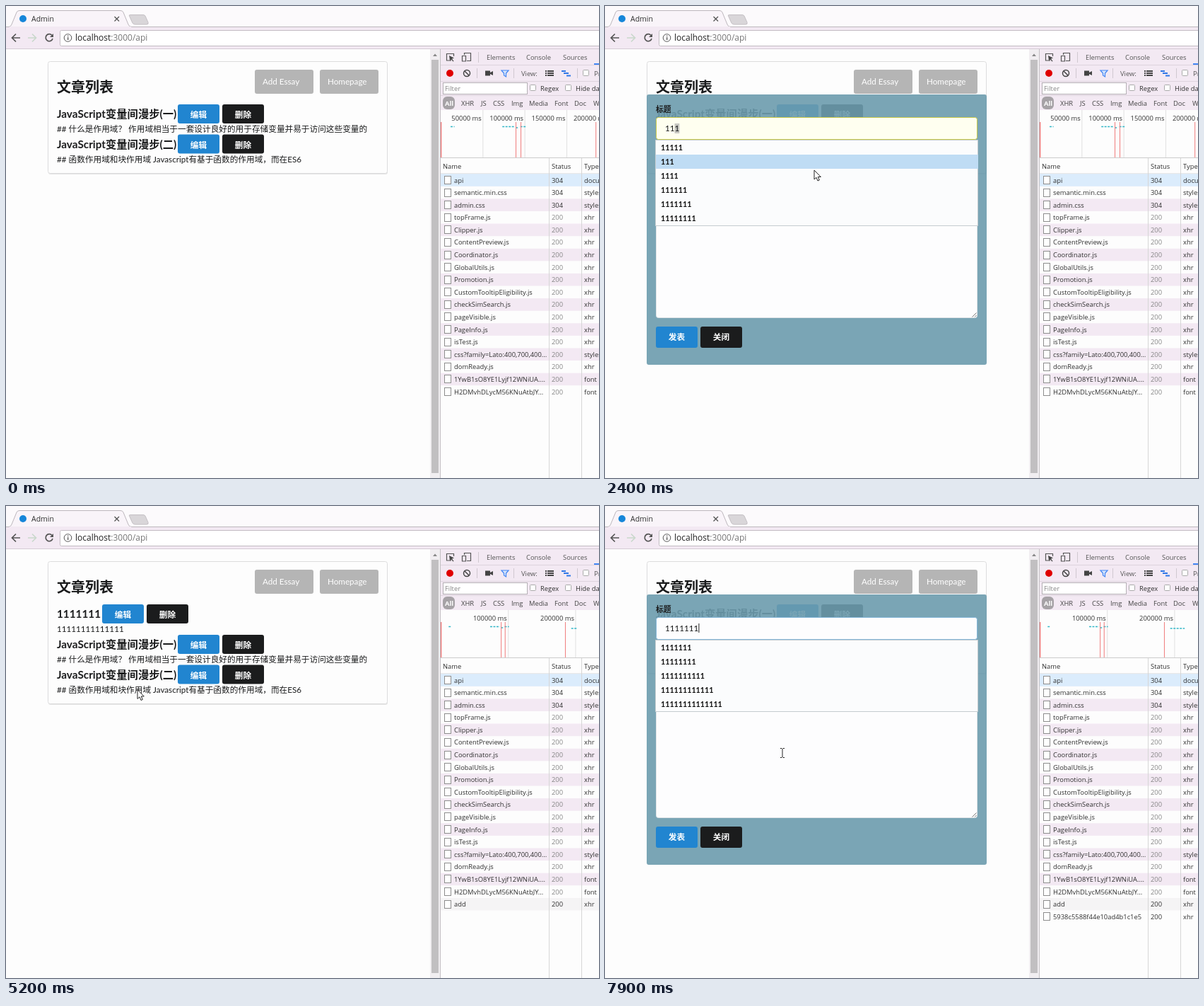
An HTML page for the animation above (8 s loop, 839 by 667 pixels).

```html
<!DOCTYPE html>
<html lang="zh">
<head>
<meta charset="utf-8">
<title>Admin</title>
<style>
html, body { margin: 0; width: 100%; height: 100%; overflow: hidden; background: #fdfdfd; }
svg { display: block; font-family: "Open Sans", sans-serif; }
.page { font-family: Lato, "Noto Sans CJK SC", "Noto Sans CJK", sans-serif; }
</style>
</head>
<body>
<svg id="stage" width="839" height="667" viewBox="0 0 839 667"></svg>
<script>
const stage = document.getElementById('stage');
const LOOP = 8000, STEP = 100;
const PINK = '#f3e9f3', BLUE = '#2185d0', BLACK = '#1b1c1d', INK = '#303030';

const rect = (x, y, w, h, fill, extra = '') =>
  `<rect x="${x}" y="${y}" width="${w}" height="${h}" fill="${fill}" ${extra}/>`;
const box = (x, y, w, h, fill, stroke, r = 0) =>
  rect(x + .5, y + .5, w - 1, h - 1, fill, `stroke="${stroke}" rx="${r}"`);
const path = (d, stroke, fill = 'none', width = 1, extra = '') =>
  `<path d="${d}" stroke="${stroke}" fill="${fill}" stroke-width="${width}" ${extra}/>`;
const text = (x, y, s, size = 9.4, fill = INK, extra = '') =>
  `<text x="${x}" y="${y}" font-size="${size}" fill="${fill}" ${extra}>${s}</text>`;
const bold = (x, y, s, size, fill = BLACK) => text(x, y, s, size, fill, 'font-weight="700"');
const ones = n => '1'.repeat(n);
const last = (keys, t) => keys.filter(k => k[0] <= t).pop();

function button(x, y, w, h, label, fill, drop = 0) {
  return rect(x, y, w, h, fill, 'rx="3"') +
    text(x + w / 2, y + h / 2 + 4.2 + drop, label, 11.67, '#fff', 'text-anchor="middle" font-weight="700"');
}
const grayButton = (x, label) =>
  rect(x, 90, 83, 34, '#b5b5b5', 'rx="3"') + text(x + 11, 111, label, 11.67, '#fff');

// ---------- timing ----------
const between = (t, a, b) => t >= a && t < b;
const modalOpen = t => between(t, 1100, 4500) || t >= 6500;

// [time, typed length, dropdown shown, hovered row]
const titleKeys = [
  [0, 0, 0, -1], [1900, 1, 0, -1], [2000, 1, 1, -1], [2200, 2, 1, -1], [2300, 2, 1, 1],
  [2500, 2, 1, 2], [2600, 2, 1, 4], [2700, 7, 0, -1], [6500, 0, 0, -1], [6900, 1, 1, -1],
  [7100, 1, 1, 1], [7300, 2, 1, -1], [7400, 3, 1, -1], [7500, 4, 1, -1], [7600, 5, 1, -1],
  [7700, 6, 1, -1], [7800, 7, 1, -1]
];
const history = [5, 3, 4, 1, 6, 7, 8, 10, 12, 14];

// [time, x, y, shape]
const cursorKeys = [
  [400, 310, 330, 'arrow'], [900, 397, 118, 'hand'], [1200, 397, 118, 'arrow'], [1700, 306, 178, 'beam'],
  [1900, 306, 178, 'arrow'], [2400, 296, 232, 'arrow'], [2700, 290, 276, 'arrow'], [3000, 283, 385, 'beam'],
  [3700, 283, 385, 'beam'], [4100, 104, 478, 'arrow'], [4200, 92, 494, 'arrow'], [4300, 95, 477, 'hand'],
  [4500, 95, 477, 'arrow'], [4800, 95, 477, 'arrow'], [5000, 147, 372, 'arrow'], [5400, 225, 147, 'hand'],
  [5900, 225, 147, 'arrow'], [6400, 398, 106.5, 'hand'], [6500, 398, 106.5, 'arrow'], [6800, 300, 172, 'beam'],
  [6900, 290, 182, 'arrow'], [7200, 245, 229, 'arrow'], [7700, 250, 306, 'arrow'], [7800, 251, 338, 'beam'],
  [7900, 251, 349, 'beam']
];
const shapes = {
  arrow: path('M0 0V13L3 10.3L5 15L7.3 14L5.3 9.5H9.3Z', '#222', '#fff'),
  beam: path('M-3 -6.5H-1L0 -5.5L1 -6.5H3M0 -5.5V5.5M-3 6.5H-1L0 5.5L1 6.5H3', '#222'),
  hand: path('M-1.3 1.5Q0 -.7 1.4 1.5V7Q3 5.6 4 7.4Q5.8 6.3 6.6 8Q8.8 7.2 9.2 9.5V13L7.5 16V18.8H0V16.5' +
    'L-4 11Q-3.5 8.3 -1.3 11ZM1.4 7V10M4 7.4V10M6.6 8V10.5', '#222', '#fff')
};

function cursor(t) {
  const from = last(cursorKeys, t);
  if (!from) return '';
  const to = cursorKeys.find(k => k[0] > t) || from;
  const p = to === from ? 0 : (t - from[0]) / (to[0] - from[0]);
  const [x, y] = [1, 2].map(i => from[i] + (to[i] - from[i]) * p);
  return `<g transform="translate(${x} ${y})">${shapes[from[3]]}</g>`;
}

// ---------- browser frame ----------
function browser() {
  return rect(0, 0, 839, 30, '#fcfafc') + rect(0, 30, 839, 31, PINK) +
    path('M0 29.5H4Q7 29 8 26L15 9Q16 6.5 19 6.5H162Q165 6.5 166 9L173 26Q174 29.5 178 29.5H839', '#bdb7bd', '#f9f4f9') +
    rect(5, 29, 172, 2, PINK) +
    path('M174.5 14Q173.5 12.5 176 12.5H194Q196 12.5 197 14L201 23Q202 26 199 26H183Q180 26 179 24Z', '#c4c0c4', '#d9d6d9') +
    '<circle cx="24" cy="18" r="5" fill="#1686d9"/>' +
    text(36, 22, 'Admin', 10.5) + path('M153.5 15L160 21.5M160 15L153.5 21.5', '#555', 'none', 1.3) +
    path('M20 45H9M14 39.5L8.5 45L14 50.5', '#555', 'none', 1.7) +
    path('M31 45H42M37 39.5L42.5 45L37 50.5', '#c9d8cc', 'none', 1.7) +
    path('M65 41.5A5 5 0 1 0 66 46', '#555', 'none', 1.7) + path('M67 39V44H62Z', 'none', '#555') +
    box(76, 34, 780, 23, '#fff', '#c3bcc3', 2) +
    '<circle cx="87.5" cy="45" r="5.3" fill="none" stroke="#555"/>' +
    rect(87, 44, 1.3, 4, '#555') + rect(87, 41.7, 1.3, 1.3, '#555') +
    text(98, 49, 'localhost<tspan fill="#777">:3000/api</tspan>', 12, '#222') +
    rect(0, 60, 839, 1, '#d5ccd5') +
    rect(600, 61, 14, 606, '#f1eef1') + rect(602, 76, 10, 584, '#c1bfc1') +
    path('M604 71L607 67.5L610 71Z', 'none', '#888');
}

// ---------- article list ----------
function article(y, title, body, buttonX) {
  return bold(72, y + 19, title, 15.3) +
    button(buttonX, y, 59, 27, '编辑', BLUE, 1.3) + button(buttonX + 63, y, 59, 27, '删除', BLACK, 1.3) +
    text(72, y + 39, body, 11.67, BLACK);
}

function list(t) {
  const added = between(t, 4600, 5700), shift = added ? 43 : 0;
  return rect(60, 80, 480, 158 + shift, '#e4e4e4', 'rx="3"') +
    box(59, 78, 481, 159 + shift, '#fdfdfd', '#dcdcdd', 3) +
    bold(72, 122, '文章列表', 20) +
    grayButton(352, 'Add Essay') + grayButton(444, 'Homepage') +
    (added ? article(139, ones(7), ones(14), 136) : '') +
    article(139 + shift, 'JavaScript变量间漫步(一)', '## 什么是作用域？ 作用域相当于一套设计良好的用于存储变量并易于访问这些变量的', 243) +
    article(181.5 + shift, 'JavaScript变量间漫步(二)', '## 函数作用域和块作用域 Javascript有基于函数的作用域，而在ES6', 243);
}

// ---------- editor ----------
const DIGIT = 6.77;
const caret = (n, y) => rect(85 + n * DIGIT, y, 1, 13, '#222');

function dropdown(rows, hover) {
  return box(71, 189, 457, rows.length * 20 + 2, '#fbfcfd', '#c5ccd0') +
    (hover >= 0 ? rect(72, 190 + hover * 20, 456, 20, '#bfdcf4') : '') +
    rows.map((n, i) => bold(79, 204 + i * 20, ones(n), 10.7, '#111')).join('');
}

function editor(t) {
  const [, typed, open, hover] = last(titleKeys, t);
  const rows = history.filter(n => n >= typed).slice(0, 6);
  const preview = hover >= 0;
  const shown = preview ? rows[hover] : typed;
  const inBody = between(t, 3000, 4500);
  const bodyLength = inBody ? Math.min(14, 1 + Math.max(0, Math.floor((t - 3300) / 100) * 3)) : 0;
  const inTitle = !inBody && (between(t, 1700, 3000) || t >= 6800);
  return rect(59, 125, 481, 382, 'rgba(108,156,173,.9)', 'rx="3"') +
    bold(72, 149.5, '标题', 10.83) + bold(72, 200.5, '正文', 10.83) +
    box(72, 157, 455, 32, preview ? '#fffff0' : '#fdfdfe', preview ? '#c9c94a' : open ? '#85b7d9' : '#dfe3e6', 3) +
    (preview ? rect(85 + typed * DIGIT, 166, (shown - typed) * DIGIT, 14, '#c6c6c0') : '') +
    text(85, 177, ones(shown), 11.67, BLACK) +
    (inTitle && !preview ? caret(typed, 166) : '') +
    box(72, 208, 455, 233, '#fdfdfe', inBody ? '#b9d3e2' : '#dfe3e6', 3) +
    text(85, 230, ones(bodyLength), 11.67, BLACK) +
    (inBody && t < 4300 ? caret(bodyLength, 219) : '') +
    path('M519.5 439.5L525.5 433.5M523 439.5L525.5 437', '#777') +
    button(72, 453, 59, 30, '发表', inBody && t >= 4300 ? '#1678c2' : BLUE) +
    button(135, 453, 59, 30, '关闭', BLACK) +
    (open ? dropdown(rows, hover) : '');
}

// ---------- developer tools ----------
const files = ('api semantic.min.css admin.css topFrame.js Clipper.js ContentPreview.js Coordinator.js GlobalUtils.js ' +
  'Promotion.js CustomTooltipEligibility.js checkSimSearch.js pageVisible.js PageInfo.js isTest.js ' +
  'css?family=Lato:400,700,400... domReady.js 1YwB1sO8YE1Lyjf12WNiUA.... H2DMvhDLycM56KNuAtbJY... add ' +
  '5938c5588f44e10ad4b1c1e5').split(' ');
const fileType = (name, i) => i === 0 ? 'document' : /css/.test(name) ? 'stylesheet' : /\.{3}/.test(name) ? 'font' : 'xhr';
const labels = (y, fill, items) => items.map(([x, s]) => text(x, y, s, 9.4, fill)).join('');
const check = (x, y) => box(x, y, 9, 9, '#fff', '#aaa', 1);

function toolbars() {
  return rect(614, 61, 225, 86, PINK) +
    [83, 106, 126].map(y => rect(615, y, 224, 1, '#ddd3dd')).join('') +
    path('M630 77H623.5V67.5H633.5V71', '#555', 'none', 1.2) +
    path('M627 70L634 73.5L631 74.5L633.5 78L632.5 78.5L630 75.5L628 77.5Z', 'none', '#444') +
    path('M648.5 69V66.5H657.5V77.5H652M645.5 70.5H650.5V78H645.5Z', '#555', 'none', 1.2) +
    rect(668, 65, 1, 15, '#d0c8d0') + rect(832, 81, 7, 2, '#4285f4') +
    labels(76, '#555', [[680, 'Elements'], [736, 'Console'], [788, 'Sources']]) +
    '<circle cx="628" cy="95" r="5" fill="#e00000"/><circle cx="652" cy="95" r="4.5" fill="none" stroke="#444" stroke-width="1.5"/>' +
    path('M649 92L655 98', '#444', 'none', 1.5) +
    [666, 718, 808].map(x => rect(x, 88, 1, 14, '#d0c8d0')).join('') +
    path('M678 91.5H685V94L689 92V98L685 96V98.5H678Z', 'none', '#444') +
    path('M701 91H711L707.5 95V100L704.5 98V95Z', '#4285f4', '#d7e6fd', 1.2) +
    text(729, 98.5, 'View:', 9.4, '#555') +
    path('M763 92H765M766 92H775M763 95H765M766 95H775M763 98H765M766 98H775', '#444', 'none', 1.8) +
    path('M786 92H792M789 95H796M793 98.5H799', '#2f78e8', 'none', 1.8) +
    check(816, 90) + text(832, 98.5, 'Preserve log', 9.4, '#555') +
    box(618, 108, 120, 17, '#fff', '#b5b0b5') + text(621, 120, 'Filter', 9.4, '#888') +
    check(741, 111) + text(756, 120, 'Regex') + check(791, 111) + text(806, 120, 'Hide data URLs') +
    rect(618, 128, 17, 18, '#a6a2a6', 'rx="6"') + bold(621, 141, 'All', 9.4, '#fff') +
    labels(141, '#444', [[644, 'XHR'], [672, 'JS'], [689, 'CSS'], [715, 'Img'], [740, 'Media'], [776, 'Font'], [804, 'Doc'], [831, 'WS']]);
}

function overview(t) {
  const late = t >= 4500, tick = late ? 100000 : 50000, scale = late ? .000952 : .001186;
  const X = ms => 615 + ms * scale;
  const dash = (a, b, y) => path(`M${X(a)} ${y}H${X(b)}`, '#35b8c8', 'none', 1.5, 'stroke-dasharray="3 1.5"');
  let out = rect(615, 147, 224, 68, '#fdfdfd');
  for (let k = 1; k < 5; k++) {
    out += rect(X(k * tick), 147, 1, 67, '#e2e2e2') +
      text(X(k * tick) - 1.5, 161.5, `${k * tick} ms`, 9.4, INK, 'text-anchor="end"');
  }
  out += dash(11800, 16500, 170.5) + dash(73500, 88000, 170.5) + dash(89500, 93000, 172) + dash(95000, 101500, 170.5);
  if (late) out += dash(194000, t >= 5600 ? 215500 : 203000, 173);
  return out + rect(615, 164, 1.3, 50, '#ef7777') +
    [89400, 95300, 184800].map(ms => rect(X(ms), 164, 1, 50, '#f07c7c')).join('');
}

function requests(t) {
  const count = t >= 5600 ? 20 : t >= 4500 ? 19 : 18, H = 17.59;
  let out = rect(615, 214, 224, 453, '#fdfdfd') + rect(615, 214, 224, 1, '#ccc') + rect(615, 236.5, 224, 1, '#d5d5d5') +
    labels(230, INK, [[618, 'Name'], [772, 'Status'], [818, 'Type']]);
  files.slice(0, count).forEach((name, i) => {
    const y = 246 + i * H, cached = i < 3;
    if (i % 2 === 0) out += rect(615, y - H / 2, 224, H, i === 0 ? '#dbecfc' : i === 18 ? '#f5f4f5' : PINK);
    out += box(620, Math.round(y - 6), 10, 12, '#fff', '#8d8d8d') +
      labels(y + 3.5, INK, [[634, name], [818, fileType(name, i)]]) +
      text(772, y + 3.5, cached ? 304 : 200, 9.4, cached || i > 17 ? INK : '#858585');
  });
  return out + rect(768, 215, 1, 452, '#d6d6d6') + rect(814, 215, 1, 452, '#d6d6d6') + rect(614, 61, 1, 606, '#c4c0c4');
}

// ---------- playback ----------
const fixed = browser() + toolbars();
let shownStep = -1;

function frame(now) {
  const t = Math.floor(now % LOOP / STEP) * STEP;
  if (t !== shownStep) {
    shownStep = t;
    stage.innerHTML = rect(0, 0, 839, 667, '#fdfdfd') + fixed + overview(t) + requests(t) +
      `<g class="page">${list(t)}${modalOpen(t) ? editor(t) : ''}</g>` + cursor(t);
  }
  requestAnimationFrame(frame);
}
frame(performance.now());
</script>
</body>
</html>
```
